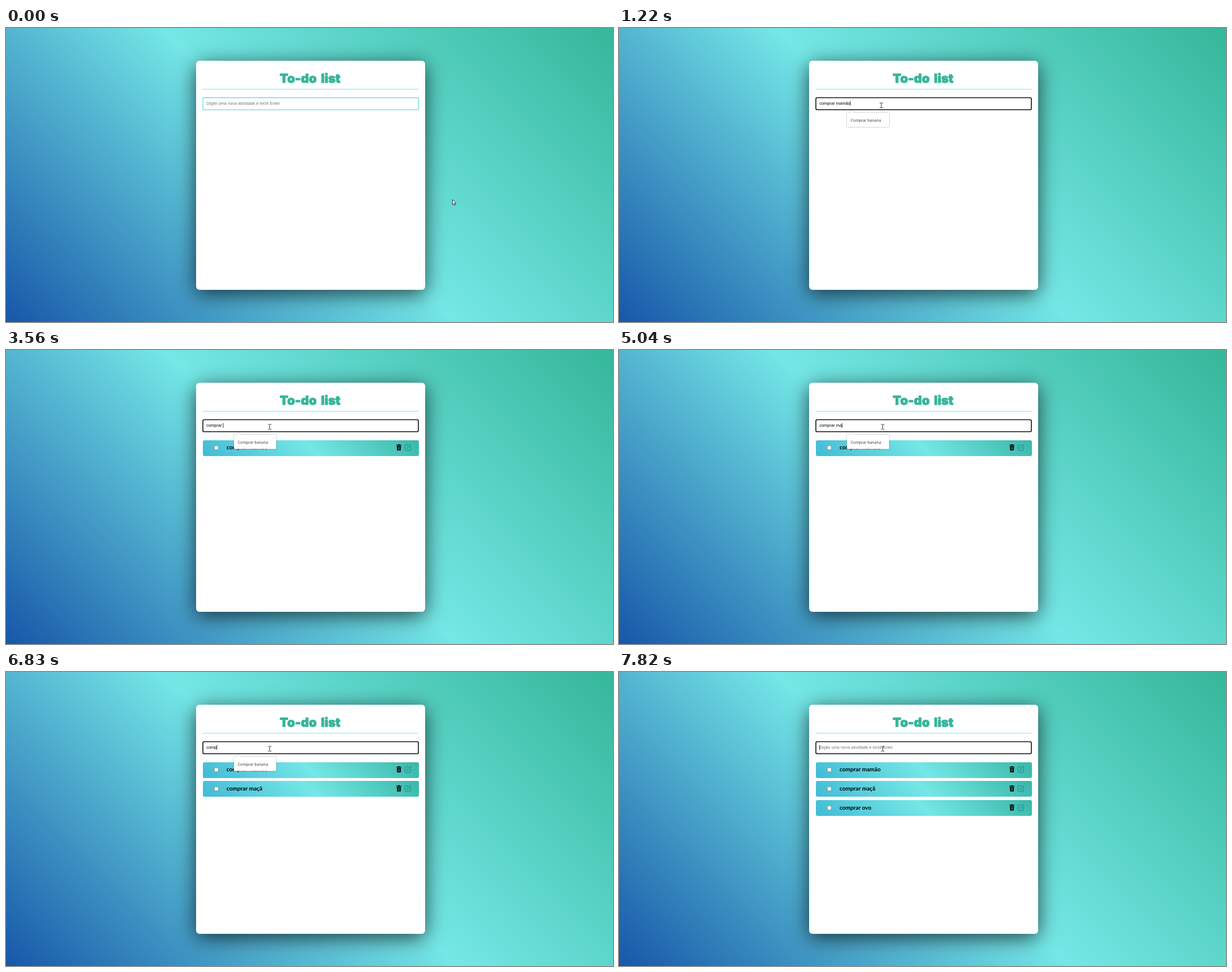
Animation, 1076 px wide and 521 px high, one loop 8 s. Source, as an HTML page:

```html
<!DOCTYPE html>
<html lang="pt-BR">
<head>
<meta charset="utf-8">
<title>To-do list</title>
<style>
  html, body { margin: 0; width: 100%; height: 100%; overflow: hidden; }
  #stage {
    position: relative; width: 1076px; height: 521px; overflow: hidden;
    background: linear-gradient(45deg, #1757a9, #74e7e6 50%, #35b79a);
  }
  #card {
    position: absolute; left: 337px; top: 58px; width: 406px; height: 406px;
    border-radius: 6px; background: #fff;
    box-shadow: 0 7px 36px rgba(0, 0, 0, .7);
  }
  .row {
    position: absolute; left: 348.5px; width: 383px; height: 28px;
    border-radius: 3px;
    background: linear-gradient(45deg, #42bad5, #74e7e6 50%, #39b7a8);
  }
  svg { position: absolute; left: 0; top: 0; }
  text { text-rendering: geometricPrecision; white-space: pre; }
  .title {
    font: 900 22px Inter, sans-serif; text-anchor: middle;
    fill: #36b59b; stroke: #36b59b; stroke-width: .9; stroke-linejoin: round;
  }
  .field { font: 7.5px "Liberation Sans", Arial, sans-serif; }
  .task { font: 700 10.15px Lato, sans-serif; }
  .hint { font: 6.75px "Noto Sans", sans-serif; fill: #333; }
  #popup { filter: drop-shadow(0 .7px 1.2px rgba(0, 0, 0, .4)); }
</style>
</head>
<body>
<div id="stage">
  <div id="card"></div>
  <div id="rows"></div>
  <svg width="1076" height="521" viewBox="0 0 1076 521">
    <defs>
      <g id="controls">
        <rect x="369.3" y="10.3" width="7" height="7" rx="1.3" fill="#fff" stroke="#767676" stroke-width=".7"/>
        <path d="M692 8.4h9v1.4h-9zM694.7 8.4v-1h3.6v1M692.7 10.4h7.6l-.6 8.2h-6.4z"/>
        <path d="M694.9 11.7l.3 5.6M696.5 11.7v5.6M698.1 11.7l-.3 5.6" stroke="#3fbfb5" stroke-width=".6"/>
        <g fill="none" stroke="#16868e" stroke-linejoin="round">
          <path d="M713 8.6h-4.6q-1.3 0-1.3 1.3v7.4q0 1.3 1.3 1.3h7.4q1.3 0 1.3-1.3v-4.6"/>
          <path d="M710.6 15.2l.5-2.2 5.3-5.4 1.7 1.7-5.3 5.4zM715.2 8.8l1.7 1.7" stroke-width=".8"/>
        </g>
      </g>
    </defs>
    <text class="title" x="518" y="97">To-do</text>
    <text class="title" x="575.5" y="97">list</text>
    <path d="M348.5 108.5h383" stroke="#7de5e2"/>
    <rect id="input" x="349" y="123.5" width="382" height="21.3" rx="2.4" fill="#fff"/>
    <text id="entry" class="field" x="355.2" y="136.4"></text>
    <path id="caret" d="M0 129.5v8.5" stroke="#000" stroke-width=".8"/>
    <g id="tasks"></g>
    <g id="popup">
      <path d="M406 150h2.5l4-3 4 3H477q2 0 2 2v21.5q0 2-2 2H406q-2 0-2-2V152q0-2 2-2z" fill="#fff"/>
      <text class="hint" x="410.8" y="165.6">Comprar banana</text>
    </g>
    <path id="arrow" d="M0 0v9l2.1-1.9 1.4 3.2 1.5-.7-1.4-3h2.7z" fill="#fff" stroke="#111" stroke-width=".8"/>
    <path id="beam" d="M-3 -4.2h2.2l.8.6.8-.6h2.2M0-3.7v7.5M-3 4.3h2.2l.8-.6.8.6h2.2" fill="none" stroke="#222" stroke-width=".9"/>
  </svg>
</div>
<script>
const LOOP = 8000, FOCUS = 850;
const PLACEHOLDER = 'Digite uma nova atividade e tecle Enter';
const $ = id => document.getElementById(id);

// Text in the field from each time on
const typing = [
  [0, ''], [1220, 'comprar mamão'], [2450, ''],
  [2550, 'c'], [2940, 'co'], [3010, 'com'],
  [3240, 'comp'], [3320, 'compr'], [3400, 'compra'], [3480, 'comprar'], [3560, 'comprar '],
  [4760, 'comprar m'], [5040, 'comprar ma'], [5140, 'comprar maç'], [5330, 'comprar maçã'],
  [5800, ''], [6340, 'c'], [6630, 'co'], [6730, 'com'], [6830, 'comp'],
  [7070, 'compr'], [7140, 'compra'], [7210, 'comprar'], [7290, 'comprar '],
  [7550, 'comprar o'], [7640, 'comprar ov'], [7730, 'comprar ovo'], [7820, '']
];
const tasks = [[2450, 'comprar mamão'], [5800, 'comprar maçã'], [7820, 'comprar ovo']];
const caretOff = [[1720, 2210], [4210, 4760], [6240, 6340]];
// Fade-in start and end, fade-out start and end
const popups = [[850, 930, 2449, 2450], [2940, 3010, 5140, 5350], [6630, 6740, 7560, 7800]];
const mousePath = [
  [20, 791.5, 304], [200, 712, 210], [380, 590, 106], [500, 520, 85],
  [600, 482, 105], [740, 465, 137], [1370, 465, 137], [1600, 463.5, 157], [1850, 467.5, 136]
];

const rows = tasks.map(([start, label], i) => {
  const top = 159.5 + 33.75 * i;
  $('rows').insertAdjacentHTML('beforeend', `<div class="row" style="top:${top}px"></div>`);
  $('tasks').insertAdjacentHTML('beforeend',
    `<g transform="translate(0 ${top})"><use href="#controls"/><text class="task" x="391" y="16.8">${label}</text></g>`);
  return { start, parts: [$('rows').lastChild, $('tasks').lastChild] };
});

const ramp = (t, a, b) => Math.min(1, Math.max(0, (t - a) / (b - a)));
const show = (el, on) => { el.style.visibility = on ? 'visible' : 'hidden'; };

function mouseAt(t) {
  const i = mousePath.findIndex(p => p[0] > t);
  if (i === 0) return mousePath[0].slice(1);
  if (i < 0) return mousePath[mousePath.length - 1].slice(1);
  const [t0, x0, y0] = mousePath[i - 1], [t1, x1, y1] = mousePath[i];
  const k = ramp(t, t0, t1);
  return [x0 + (x1 - x0) * k, y0 + (y1 - y0) * k];
}

function drawField(t) {
  const text = typing.filter(([start]) => start <= t).pop()[1];
  const focused = t >= FOCUS;
  const entry = $('entry');
  entry.textContent = text || PLACEHOLDER;
  entry.setAttribute('fill', text ? '#000' : '#757575');
  $('input').setAttribute('stroke', focused ? '#101010' : '#62dedb');
  $('input').setAttribute('stroke-width', focused ? 1.6 : 1.3);
  const caretX = 355.4 + (text ? entry.getComputedTextLength() : 0);
  $('caret').setAttribute('transform', `translate(${caretX} 0)`);
  show($('caret'), focused && !caretOff.some(([a, b]) => t >= a && t < b));
}

function drawMouse(t) {
  const [x, y] = mouseAt(t);
  const overInput = x > 348 && x < 732 && y > 123 && y < 146;
  const overTitle = x > 485 && x < 595 && y > 78 && y < 100;
  const overText = overInput || overTitle;
  for (const id of ['arrow', 'beam']) $(id).setAttribute('transform', `translate(${x} ${y})`);
  show($('beam'), overText);
  show($('arrow'), !overText);
}

function draw(now) {
  const t = now % LOOP;
  drawField(t);
  for (const { start, parts } of rows) parts.forEach(el => show(el, t >= start));
  $('popup').style.opacity = Math.max(...popups.map(([a, b, c, d]) => ramp(t, a, b) * (1 - ramp(t, c, d))));
  drawMouse(t);
  requestAnimationFrame(() => draw(performance.now()));
}
draw(performance.now());
</script>
</body>
</html>
```
